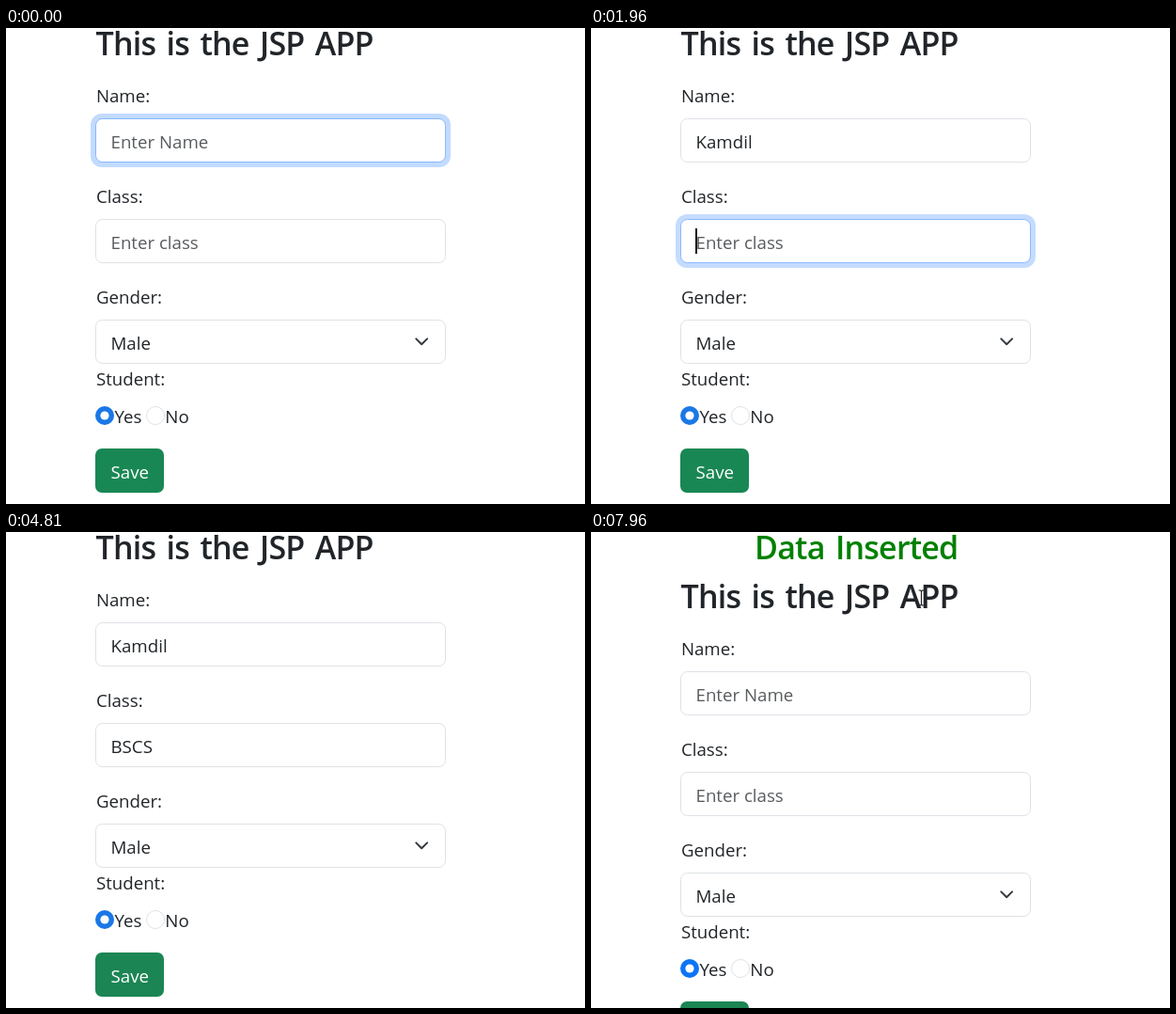
These frames come from a looping animation (616 by 506 pixels, 8000 ms). An HTML page:

```html
<!DOCTYPE html>
<html lang="en">
<head>
<meta charset="utf-8">
<title>JSP form</title>
<style>
html, body { margin: 0; width: 100%; height: 100%; overflow: hidden; background: #fff; }
svg { display: block; width: 616px; height: 506px; font: 18.7px "Open Sans", "Noto Sans", sans-serif; }
text { fill: #212529; white-space: pre; }
.title { font-size: 34px; font-weight: 600; letter-spacing: -.8px; word-spacing: 3.4px; }
.hint { fill: #595c5f; }
.field { fill: #fff; stroke: #dee2e6; }
.ring { fill: #c2dbfe; }
.focus { fill: #fff; stroke: #86b7fe; }
</style>
</head>
<body>
<svg viewBox="0 0 616 506">
  <text id="done" class="title" x="174" y="29" style="fill:#008000">Data Inserted</text>
  <g id="form">
    <text class="title" x="95.5" y="29">This is the JSP APP</text>
    <text x="95.9" y="79">Name:</text>
    <g id="name"></g>
    <text x="95.9" y="186">Class:</text>
    <g id="grade"></g>
    <text x="95.9" y="293">Gender:</text>
    <rect class="field" x="95.5" y="310.5" width="372" height="46" rx="7"/>
    <text x="111.5" y="342">Male</text>
    <path d="M436.3 330.4l5.9 5.9 5.9-5.9" fill="none" stroke="#343a40" stroke-width="2" stroke-linecap="round" stroke-linejoin="round"/>
    <text x="95.9" y="380">Student:</text>
    <circle id="radio" cx="105" cy="412" r="10"/>
    <circle cx="105" cy="412" r="4.6" fill="#fff"/>
    <text x="115.5" y="420">Yes</text>
    <circle class="field" cx="159" cy="412" r="9.5"/>
    <text x="169.3" y="420">No</text>
    <rect id="save" x="95" y="447" width="73" height="47" rx="7"/>
    <text x="111.5" y="479" style="fill:#fff">Save</text>
  </g>
  <path id="beam" d="M-3 -8H-1L0 -7L1 -8H3M0 -7V7M-3 8H-1L0 7L1 8H3" fill="none" stroke="#222" stroke-width="1.2"/>
  <path id="arrow" d="M.5 .5V16.5L4.2 13L6.8 19L9.2 18L6.7 12.2H11.7Z" fill="#fff" stroke="#111"/>
</svg>
<script>
const LOOP = 8000, STEP = 70, SUBMIT = 4940;
const $ = id => document.getElementById(id);
const show = (el, on) => el.setAttribute("visibility", on ? "visible" : "hidden");
const place = (el, x, y) => el.setAttribute("transform", `translate(${x} ${y})`);

function makeInput(id, top, hint) {
  const g = $(id);
  g.innerHTML = `
    <rect class="field" x="95.5" y="${top + .5}" width="372" height="46" rx="7"/>
    <g><rect class="ring" x="90" y="${top - 5}" width="383" height="57" rx="12"/>
    <rect class="focus" x="95.5" y="${top + .5}" width="372" height="46" rx="7"/></g>
    <text x="111.5" y="${top + 32}"></text>
    <rect y="${top + 10}" width="2" height="27" fill="#111"/>`;
  const [, glow, text, caret] = g.children;
  return (value, focus, caretOn) => {
    glow.setAttribute("opacity", focus);
    text.textContent = value || hint;
    text.setAttribute("class", value ? "" : "hint");
    const end = value ? text.getComputedTextLength() - 1 : 0;
    caret.setAttribute("x", Math.round(111 + end));
    show(caret, caretOn);
  };
}
const drawName = makeInput("name", 96, "Enter Name");
const drawGrade = makeInput("grade", 203, "Enter class");

const typed = (word, times, t) => word.slice(0, times.filter(at => t >= at).length);
const within = (t, a, b) => t >= a && t < b;

// last value whose start time has been reached
const held = (t, keys) => keys.reduce((v, [at, next]) => t >= at ? next : v, 0);

function drawPointer(t) {
  let x = 0, y = 0, kind = "";
  if (within(t, 5270, 5400)) {
    kind = "arrow"; x = -6; y = 410;
  } else if (within(t, 6720, 7420)) {
    const p = Math.floor((t - 6720) / STEP) / 10;
    const e = p * p * (3 - 2 * p);
    kind = "beam"; x = Math.round(194 + 138 * e); y = Math.round(282 - 286 * e);
  } else if (within(t, 7420, 7960)) {
    kind = "arrow"; x = 325; y = -16;
  } else if (t >= 7960) {
    kind = "beam"; x = 351; y = 70;
  }
  for (const id of ["beam", "arrow"]) {
    show($(id), id === kind);
    place($(id), x + (id === "beam" ? .5 : 0), y);
  }
}

function draw(t) {
  const sent = t >= SUBMIT;
  show($("done"), sent);
  place($("form"), 0, sent ? 52 : 0);
  $("radio").setAttribute("fill", sent ? "#0d75f5" : "#1a78e6");
  $("save").setAttribute("fill", t >= 4740 ? "#1c8554" : "#198754");

  drawName(sent ? "" : typed("Kamdil", [70, 740, 940, 1090, 1160, 1420], t),
    held(t, [[0, 1], [1890, .5], [1960, 0]]),
    within(t, 70, 670) || within(t, 740, 1820));
  drawGrade(sent ? "" : typed("BSCS", [2560, 2960, 3090, 3220], t),
    held(t, [[1890, .5], [1960, .95], [2030, 1], [4740, .5], [4810, 0]]),
    within(t, 1820, 2360) || within(t, 2560, 3750) || within(t, 4280, 4740));
  drawPointer(t);
}

const start = performance.now();
function tick() {
  draw((performance.now() - start) % LOOP);
  requestAnimationFrame(tick);
}
tick();
</script>
</body>
</html>
```
